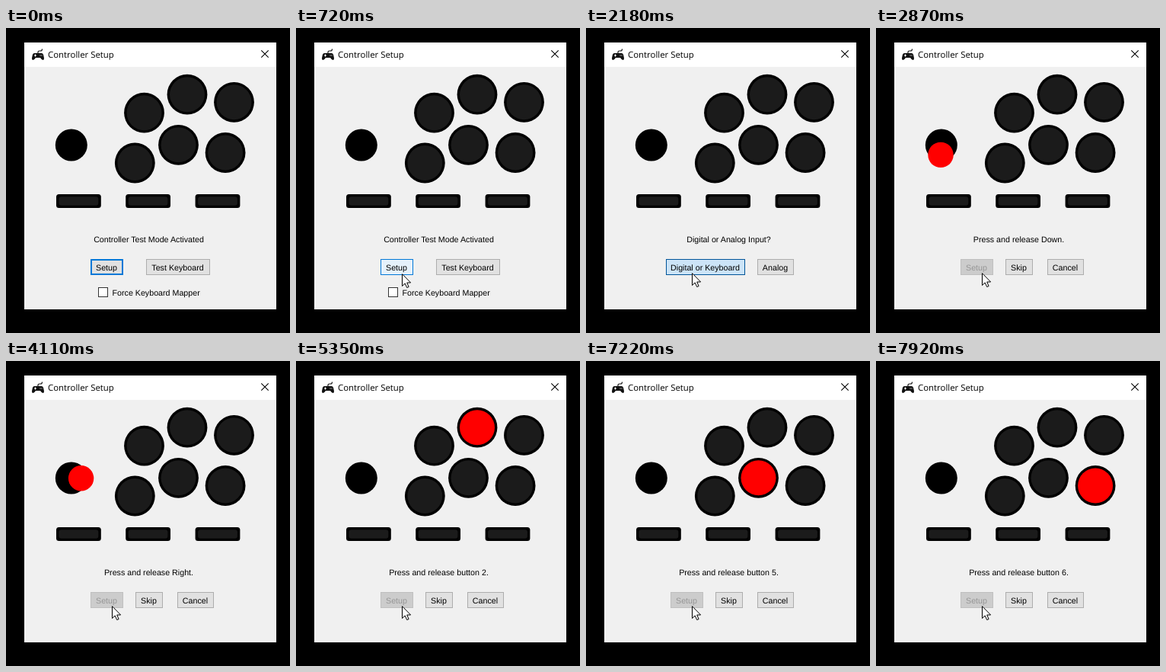
Write an HTML page that moves like this. It is 373 px wide and 400 px high and loops after 8 s.

```html
<!DOCTYPE html>
<html lang="en">
<head>
<meta charset="utf-8">
<title>Controller Setup</title>
<style>
html, body { margin: 0; width: 100%; height: 100%; overflow: hidden; background: #000; }
svg { display: block; width: 100vw; height: 100vh; }
text { font: 10.7px "Liberation Sans", Arial, sans-serif; text-rendering: geometricPrecision; white-space: pre; }
.title { font: 11.4px "Open Sans", "Noto Sans", sans-serif; }
</style>
</head>
<body>
<svg id="stage" viewBox="0 0 373 400" xmlns="http://www.w3.org/2000/svg"></svg>
<script>
const LOOP = 8000;
const stage = document.getElementById('stage');

function add(parent, tag, attrs = {}, content = '') {
  const el = document.createElementNS('http://www.w3.org/2000/svg', tag);
  set(el, attrs);
  if (content) el.textContent = content;
  parent.appendChild(el);
  return el;
}
function set(el, attrs) {
  for (const key in attrs) el.setAttribute(key, attrs[key]);
}
const show = (el, on) => set(el, { visibility: on ? 'visible' : 'hidden' });
const circle = (x, y, r, fill) => add(stage, 'circle', { cx: x, cy: y, r, fill });
const rect = (x, y, width, height, fill, rx = 0) =>
  add(stage, 'rect', { x, y, width, height, fill, rx });

// Window frame
rect(24, 19, 331, 350, '#f0f0f0');
rect(24, 19, 331, 32, '#fff');
add(stage, 'text', { x: 55, y: 39, class: 'title' }, 'Controller Setup');
add(stage, 'path', { d: 'M335.3 29.3l9.4 9.4m0-9.4l-9.4 9.4', stroke: '#000', 'stroke-width': 1.1 });

// Gamepad pictogram
add(stage, 'path', { d: 'M42 35v-3.5q0-1.5 2-1.5h1.500q2 0 2-2.500', fill: 'none', stroke: '#111', 'stroke-width': 1.2 });
add(stage, 'path', {
  d: 'M37.500 33h9q2.300 0 2.800 3l.7 3.500q.2 2.500-1.600 2.500q-1.400 0-3.400-3h-6q-2 3-3.400 3q-1.800 0-1.600-2.500l.7-3.500q.5-3 2.800-3z',
  fill: '#111'
});
add(stage, 'path', { d: 'M37 36h3m-1.500-1.500v3M44.500 36h1m1 0h1', stroke: '#fff', 'stroke-width': 1 });

// Arcade panel
circle(85.8, 153.5, 21, '#000');
const knob = circle(85, 137, 16.7, '#f00');
const pads = [[181.5, 111.2], [238, 87.2], [299.5, 97.3], [169.300, 177], [226.500, 153.3], [288.1, 163.5]]
  .map(([x, y]) => {
    circle(x, y, 26.4, '#000');
    return circle(x, y, 23, '#1b1b1b');
  });
for (const x of [66, 157.2, 248.6]) {
  rect(x, 218, 58.8, 18, '#000', 3.5);
  rect(x + 3.5, 221.3, 51.800, 11.4, '#1b1b1b', 3);
}

const message = add(stage, 'text', { x: 187.500, y: 281, 'text-anchor': 'middle' });

const looks = {
  normal: ['#e1e1e1', '#adadad', 1, '#000'],
  focus: ['#e1e1e1', '#0078d7', 2, '#000'],
  hover: ['#e5f1fb', '#0078d7', 1, '#000'],
  pressed: ['#cce4f7', '#005499', 1, '#000'],
  disabled: ['#cccccc', '#bfbfbf', 1, '#969696']
};

function button(x, width, label) {
  const box = add(stage, 'rect');
  const text = add(stage, 'text', { x: x + width / 2 - 0.5, y: 318, 'text-anchor': 'middle' }, label);
  return look => {
    show(box, look);
    show(text, look);
    if (!look) return;
    const [fill, stroke, w, ink] = looks[look];
    set(box, {
      x: x + w / 2, y: 303 + w / 2, width: width - w, height: 21 - w,
      fill, stroke, 'stroke-width': w
    });
    set(text, { fill: ink });
  };
}

const setup = button(111, 43, 'Setup');
const testKeys = button(184, 84, 'Test Keyboard');
const digital = button(105, 104, 'Digital or Keyboard');
const analog = button(225, 48, 'Analog');
const skip = button(170, 36, 'Skip');
const cancel = button(225, 48, 'Cancel');

const check = add(stage, 'rect', { x: 121.5, y: 340.5, width: 12, height: 12, fill: '#fff' });
const checkLabel = add(stage, 'text', { x: 139.500, y: 351 }, 'Force Keyboard Mapper');

const cursor = add(stage, 'path', {
  d: 'M.5 .7v15.800l3.700-3.500 2.500 5.500 2.400-1-2.400-5.500h4.900z',
  fill: '#fff', stroke: '#000', 'stroke-width': 1, 'stroke-linejoin': 'round'
});

const prompts = [
  [2260, 'Up', 85, 136.800], [2870, 'Down', 85, 166.4], [3500, 'Left', 72.500, 153.8], [4110, 'Right', 98.600, 153.8],
  [4720, 'button 1'], [5350, 'button 2'], [5980, 'button 3'],
  [6610, 'button 4'], [7220, 'button 5'], [7920, 'button 6']
];

// The pointer glides in over seven steps, then settles on the button.
function pointerAt(t) {
  if (t >= 1410) return [139, 321];
  if (t >= 720) return [139, 322];
  const step = Math.min(6, Math.floor((t - 80) / 78));
  const left = (1 - step / 6) ** 1.4;
  return [Math.round(141 + 28 * left), Math.round(325 + 66 * left)];
}

function render(t) {
  const first = t < 1100;
  const choosing = !first && t < 2260;
  const mapping = t >= 2260;
  const index = prompts.findLastIndex(p => t >= p[0]);
  const prompt = prompts[index];

  message.textContent = first ? 'Controller Test Mode Activated'
    : choosing ? 'Digital or Analog Input?'
    : `Press and release ${prompt[1]}.`;

  const [px, py] = pointerAt(t);
  show(cursor, t >= 80);
  set(cursor, { transform: `translate(${px} ${py})` });

  setup(mapping ? 'disabled' : !first ? '' : t < 720 ? 'focus' : t < 1020 ? 'hover' : 'pressed');
  testKeys(first ? 'normal' : '');
  digital(!choosing ? '' : t < 1160 ? 'normal' : t < 2180 ? 'hover' : 'pressed');
  analog(choosing ? 'normal' : '');
  skip(mapping ? 'normal' : '');
  cancel(mapping ? 'normal' : '');

  const overCheck = t >= 80 && py >= 340 && py < 354;
  set(check, { stroke: overCheck ? '#0078d7' : '#333' });
  show(check, first);
  show(checkLabel, first);

  const moving = mapping && index < 4;
  show(knob, moving);
  if (moving) set(knob, { cx: prompt[2], cy: prompt[3] });
  pads.forEach((pad, i) => set(pad, { fill: index === i + 4 ? '#f00' : '#1b1b1b' }));
}

const start = performance.now();
function tick() {
  render((performance.now() - start) % LOOP);
  requestAnimationFrame(tick);
}
tick();
</script>
</body>
</html>
```
